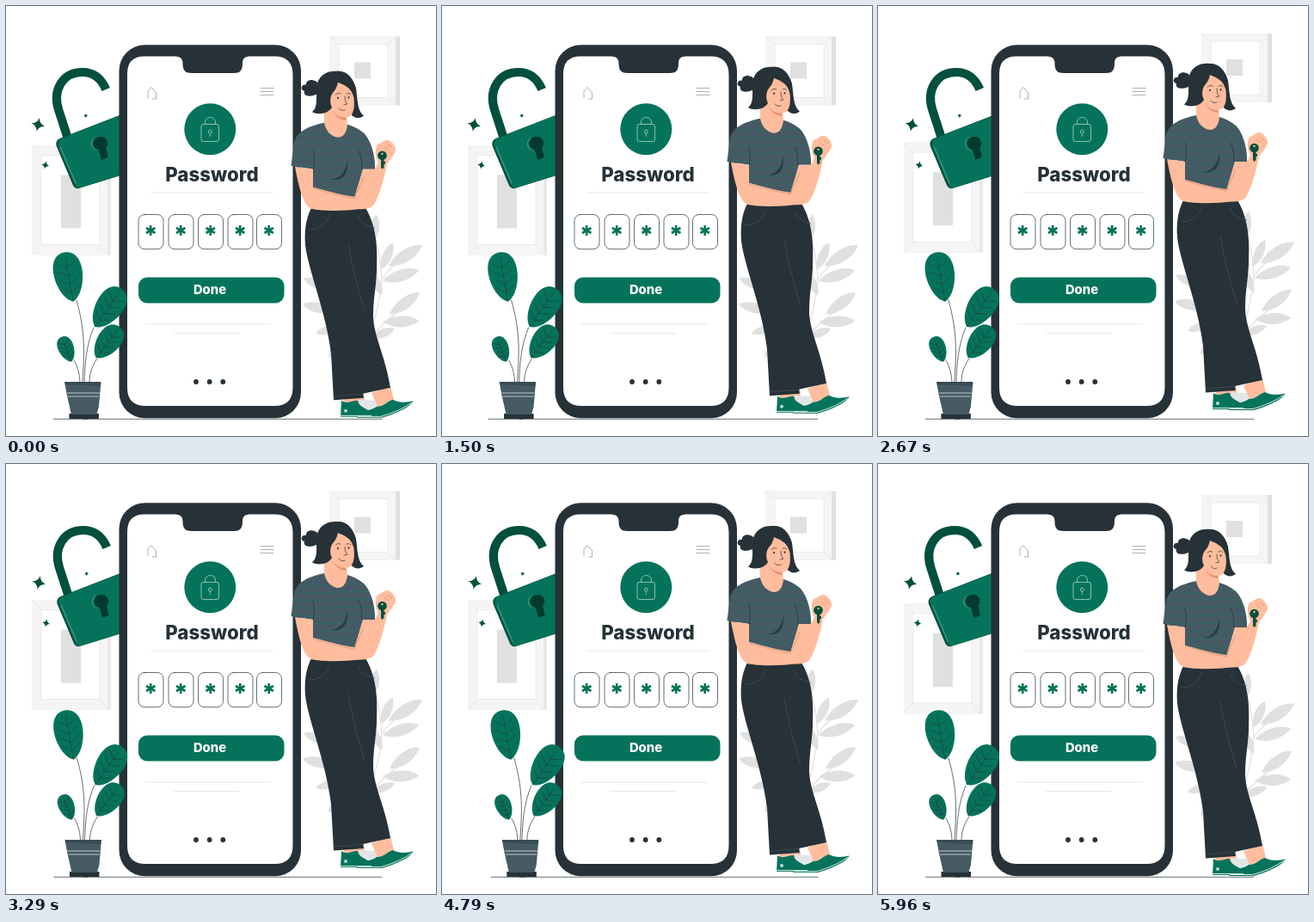
Animation of 500 by 500 pixels, one loop 6000 ms. Source, as an HTML page:

```html
<!DOCTYPE html>
<html lang="en">
<head>
<meta charset="utf-8">
<title>Password screen</title>
<style>
  html, body { margin: 0; width: 100%; height: 100%; overflow: hidden; background: #fff; }
  svg { display: block; width: 100%; height: 100%; }
  text { font-family: Inter, "Open Sans", sans-serif; font-weight: 800; text-anchor: middle; }
  .green { fill: #05735b; }
  .deep { fill: #00503d; }
  .dark { fill: #263238; }
  .slate { fill: #455a64; }
  .skin { fill: #ffbd9d; }
  .line { fill: none; stroke: #263238; stroke-width: .7; stroke-linecap: round; stroke-linejoin: round; }
  .pale { fill: none; stroke: #e3e3e3; stroke-width: .8; }
</style>
</head>
<body>
<svg viewBox="0 0 500 500">
  <defs>
    <clipPath id="shirtClip">
      <path id="shirt" d="M370 136C352 140 338 146 335 159L331.500 186L357 190L356 211L406 225L415 190L429 190C430 177 425 157 416 148C409 142 403 140 397 138C396 148 392 153 386 153C378 152 372 146 370 136Z"/>
    </clipPath>
    <path id="star" d="M0 -8Q1.3 -1.3 8 0Q1.3 1.3 0 8Q-1.3 1.3 -8 0Q-1.3 -1.3 0 -8Z"/>
  </defs>

  <g id="backdrop">
    <rect x="30" y="162.500" width="92" height="128" fill="#e8e8e8"/>
    <rect x="30" y="162.500" width="88" height="128" fill="#f5f5f5"/>
    <path d="M30 162.500L41 174M118 162.500L109 174M30 290L41 278M118 290L109 278" class="pale"/>
    <rect x="41" y="174" width="68" height="104" fill="#fff" stroke="#e8e8e8" stroke-width=".8"/>
    <rect x="64" y="197" width="23" height="62" fill="#e0e0e0"/>
    <rect x="376" y="36" width="82" height="80" fill="#e0e0e0"/>
    <rect x="376" y="36" width="77" height="80" fill="#f5f5f5"/>
    <path d="M376 36L387 45M453 36L444 45M376 116L387 107M453 116L444 107" class="pale"/>
    <rect x="387" y="45" width="57" height="62" fill="#fff" stroke="#e8e8e8" stroke-width=".8"/>
    <rect x="405" y="66" width="19" height="19" fill="#e0e0e0"/>
    <g id="foliage" fill="#e0e0e0">
      <path d="M410 408Q431 375 437 320Q436 290 427 262M424 385Q440 368 462 351M437 318Q448 302 466 292M408 400Q390 380 362 346" fill="none" stroke="#e0e0e0" stroke-width="1.200"/>
    </g>
  </g>

  <path d="M90 480.300H437" class="line"/>

  <g id="lock">
    <path d="M71.500 152L61.500 121C54 98 66 77 89 77C102 77 111 84 116.500 97" fill="none" stroke="#00503d" stroke-width="10.200"/>
    <path class="deep" d="M64 153.500L140 124V195L85 212Q80 213 78 208L59 163Q57 156 64 153.500Z"/>
    <path class="green" d="M66 153.500L140 124.500V194.500L86 211.500Q82 212 80 207L61 163Q59.500 156 66 153.500Z"/>
    <path d="M63.500 164L81.500 206.500" fill="none" stroke="#80b3a4" stroke-width=".7"/>
    <circle cx="107.500" cy="160" r="8.300" fill="#4c9983"/>
    <circle cx="108.500" cy="160" r="8.200" class="green"/>
    <path d="M110.500 152a7.500 7.500 0 0 1 6 12.500L119 176L111.500 179L108 167a7.500 7.500 0 0 1 2.500 -15Z" fill="#023b2e"/>
    <use href="#star" class="deep" transform="translate(37.500 138) rotate(12)"/>
    <use href="#star" class="deep" transform="translate(93 127.500) rotate(12) scale(.33)"/>
    <use href="#star" class="deep" transform="translate(46 185) rotate(12) scale(.57)"/>
  </g>

  <g id="phone">
    <rect class="dark" x="131.500" y="45.300" width="211.500" height="434" rx="30"/>
    <path fill="#fff" d="M161 58.500H194C203 58.500 205.500 61 205.500 67C205.500 75 208.500 78 216 78H265C272 78 275 75 275 67C275 61 277 58.500 286 58.500H312Q333.500 58.500 333.500 80V443.500Q333.500 465 312 465H162.500Q141 465 141 443.500V79Q141 58.500 161 58.500Z"/>
    <path class="line" stroke-opacity=".55" d="M165 107V99L169 94.500L174.500 101V108H170.500M296 95.500H311M296 99.500H311M296 103.500H311"/>
    <circle class="green" cx="237.300" cy="143.300" r="30"/>
    <g fill="none" stroke="#c5ded6" stroke-width=".7">
      <rect x="227" y="137.500" width="20.500" height="20" rx="2.500"/>
      <path d="M231.500 137V135a6 5.500 0 0 1 12 0V137M237.300 148.500V152"/>
      <circle cx="237.300" cy="146" r="2"/>
    </g>
    <text class="dark" x="239.500" y="203.500" font-size="22.300">Password</text>
    <path class="pale" d="M168 217H311M162 370H308M195 380.500H272"/>
    <g id="cells"></g>
    <rect class="green" x="154" y="315.500" width="169.500" height="30" rx="10"/>
    <text x="237" y="334.500" font-size="14.800" fill="#fff">Done</text>
    <g class="dark"><circle cx="221" cy="437" r="2.900"/><circle cx="236.700" cy="437" r="2.900"/><circle cx="252.300" cy="437" r="2.900"/></g>
  </g>

  <g id="plant">
    <path class="line" d="M55.500 480.300H95"/>
    <path class="line" d="M82 342C93 380 91 405 89 438M102 374C93 396 92 415 91 438M106 410C99 420 97 430 97 438M79 412C84 420 86 430 86 438"/>
    <g id="leaves"></g>
    <path class="dark" d="M73.500 474H108V480H73.500Z"/>
    <path class="slate" d="M68 437H110.500L108 466L105.500 475H76L71 453Z"/>
    <path class="dark" opacity=".35" d="M68 437H110.500L110 442L69 440Z"/>
    <path d="M71 450H109M72 454H108" stroke="#dfe4e6" stroke-width=".8"/>
  </g>

  <g id="woman">
    <path class="skin" d="M391 455L416 450L418 467L396 466ZM425 450L447 442L451 458L432 467Z"/>
    <path fill="#e3e6e6" d="M410 458L429 459L431 466L420 470L412 467Z"/>
    <path class="green" d="M390 459C397 464 404 458 409 459C410 467 421 468 425 474L424 478L389 478Z"/>
    <path class="green" d="M431 466C440 466 444 459 450 458C457 462 466 461 473.500 459.500C471 466 455 474 437 479H408C412 470 424 471 431 466Z"/>
    <path d="M389 476.500H425M409 477.500H436Q459 471 472 461" fill="none" stroke="#d7ebe4" stroke-width="1"/>
    <circle cx="395" cy="471" r="2" fill="#b9d9cf"/>
    <path class="dark" d="M355 235C348 249 347 263 348 278C351 306 372 355 378 404L381 458.500L416 456L415 451L447 444C441 407 428 385 427 362C427 340 430 330 431 310C432 285 432 258 418 235Z"/>
    <path d="M398 276Q402 305 417 354M352 260Q370 261 377 242M409 244Q414 256 429 258M382 454L416 451" fill="none" stroke="#465960" stroke-width=".6"/>

    <path class="dark" d="M361 103C352 107 345 104 347 99C341 98 344 90 349 92C348 86 357 84 362 89Z"/>
    <path class="dark" d="M385 76C396 75 404 84 407 96C409 109 408 121 416 128C409 133 402 130 398 121L380 100Z"/>
    <path class="skin" d="M369 112L370 136C371 147 378 153 386 153.500C393 153 397 147 397 138L395 120Z"/>
    <path d="M380 122Q387 129 395.500 128.500V133Q384 132 380 122Z" fill="#e98f70"/>
    <path class="skin" d="M376 104L384 86C395 90 402 97 404.500 107C406 121 403 130 395 130C387 130 381 126 378 118Z"/>
    <path class="dark" d="M386 76C369 74 360 86 361 99C361 110 362 118 356 123.500C362 127 375 126 379 118C376 112 377 105 380 101C384 97 385 93 386 89C393 92 401 95 405 105L407 97C404 84 396 76 386 76Z"/>
    <path class="line" d="M383 103Q386 100 389 102M396 102Q399 100 401 103M394 105Q394 112 397 114L393 115M387 119Q390 123 394 121"/>
    <circle class="dark" cx="386" cy="107" r="1.100"/><circle class="dark" cx="398.500" cy="106.500" r="1.100"/>

    <use href="#shirt" class="slate"/>
    <g id="stripes" clip-path="url(#shirtClip)" fill="none" stroke="#2c6f63" stroke-width=".8"></g>
    <path class="line" d="M357 190Q360 180 357 168M414 190Q414 176 410 168"/>
    <path class="dark" d="M379 202C390 200 395 192 397 180C398 194 393 204 379 202Z" opacity=".8"/>
    <path class="skin" d="M336 187L357 190L357 211C376 216 394 221 411 223L413 236C393 239 367 239 355 236C346 232 341 214 336 187Z"/>
    <path class="skin" d="M405 223L415 190L429 190L433 182C429 176 429 166 432 161C437 160 439 156 443 156C448 156 454 164 453 169C451 174 446 180 443 184C440 200 434 222 428 231C424 237 412 237 405 236Z"/>
    <path d="M357 212Q382 220 405 224L416 199M440 164L445 168M444 161L449 165" fill="none" stroke="#d97f62" stroke-width=".6"/>
    <circle class="deep" cx="437.500" cy="174" r="5.300"/>
    <path class="deep" d="M436 178H439.500V181H441V184H439.500V188L437.500 190L436 188Z"/>
    <circle cx="437.500" cy="172" r="1.200" fill="#ffbd9d"/>
  </g>
</svg>
<script>
const FPS = 24, LOOP = 6000;
const $ = id => document.getElementById(id);
const add = (id, markup) => $(id).insertAdjacentHTML("beforeend", markup);

// Leaf outline along the x axis, placed between a base and a tip.
function frond(x0, y0, x1, y1) {
  const length = Math.hypot(x1 - x0, y1 - y0);
  const angle = Math.atan2(y1 - y0, x1 - x0) * 180 / Math.PI;
  const w = length * .17 + 1.5;
  return `<path transform="translate(${x0} ${y0}) rotate(${angle})"
    d="M0 0C${length * .3} ${-w} ${length * .8} ${-w} ${length} 0C${length * .7} ${w} ${length * .3} ${w} 0 0Z"/>`;
}

function plantLeaf(x, y, rx, ry, angle) {
  let veins = `M0 ${ry}V${-ry * .8}`;
  for (let v = -.35; v < .7; v += .33) {
    veins += `M${-rx * .65} ${ry * (v - .25)}L0 ${ry * v}L${rx * .65} ${ry * (v - .25)}`;
  }
  return `<g transform="translate(${x} ${y}) rotate(${angle})">
    <path class="green" d="M0 ${ry}C${-rx * 1.1} ${ry * .75} ${-rx * 1.6} ${-ry} 0 ${-ry}C${rx * 1.6} ${-ry} ${rx * 1.1} ${ry * .75} 0 ${ry}Z"/>
    <path class="line" stroke-opacity=".75" d="${veins}"/></g>`;
}

add("foliage", [
  [427, 274, 431, 243], [436, 307, 450, 276], [445, 303, 484, 279],
  [438, 320, 480, 308], [437, 337, 425, 310], [446, 359, 481, 334],
  [438, 368, 480, 367], [425, 386, 452, 376], [378, 330, 346, 317],
  [382, 356, 345, 347], [386, 374, 360, 381], [394, 385, 375, 409]
].map(f => frond(...f)).join(""));

add("leaves", [
  [73, 315, 16.500, 29, -10], [119, 351, 15.500, 27, 35],
  [118.500, 391, 13.500, 22.500, 37], [70.500, 399, 9, 15.500, -22]
].map(l => plantLeaf(...l)).join(""));

add("cells", [154, 189, 223.500, 258, 291.500].map(x => {
  const arms = [0, 60, 120].map(a =>
    `<path d="M0 -6V6" transform="translate(${x + 14.2} 261) rotate(${a})" stroke="#05735b" stroke-width="2.600"/>`);
  return `<rect class="line" x="${x}" y="242.500" width="29" height="40.200" rx="7"/>` + arms.join("");
}).join(""));

for (let y = 148; y < 226; y += 9) {
  add("stripes", `<path d="M328 ${y}Q350 ${y + 3} 380 ${y + 1}T432 ${y + 1}"/>`);
}

const SHAKE = [0, -1, 2, -4, 4, -4, 4, -4, 2, -1, 0];
const phase = (ms, period) => ms % period / period;

function shake(ms, period) {
  const p = phase(ms, period) * 10, i = Math.floor(p);
  return SHAKE[i] + (SHAKE[i + 1] - SHAKE[i]) * (p - i);
}

const float = (ms, period) => -10 * (1 - Math.abs(1 - 2 * phase(ms, period)));
const move = (id, x, y) => $(id).setAttribute("transform", `translate(${x.toFixed(3)} ${y.toFixed(3)})`);

function render(ms) {
  const step = Math.floor((ms % LOOP + 4) * FPS / 1000);
  const t = (step + 1) * 1000 / FPS;
  move("backdrop", 0, float(t, 1500));
  move("lock", shake(t, 1500), 0);
  move("plant", shake(t, LOOP), 0);
  move("woman", 0, float(t, LOOP));
}

const start = performance.now();
function tick() {
  render(performance.now() - start);
  requestAnimationFrame(tick);
}
tick();
</script>
</body>
</html>
```
